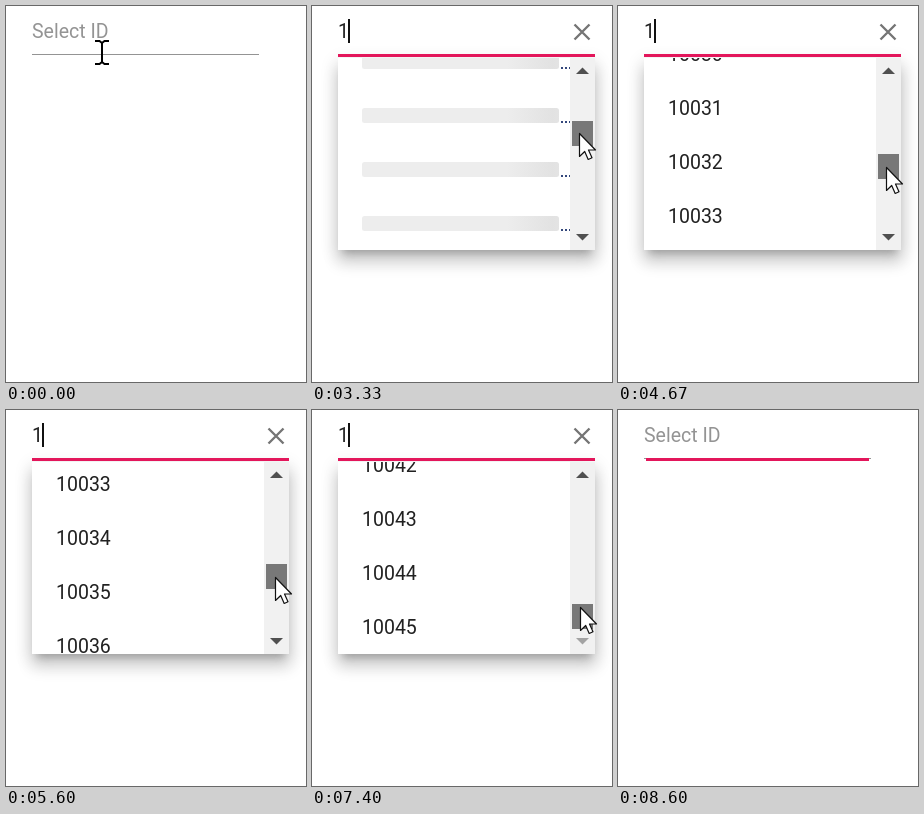
An HTML page for the animation above (8.67 s loop, 300 px wide and 376 px high).

```html
<!DOCTYPE html>
<html lang="en">
<head>
<meta charset="utf-8">
<title>Select ID</title>
<style>
html, body { margin: 0; width: 100%; height: 100%; overflow: hidden; background: #fff; }
#shadow {
  position: absolute; left: 26px; top: 52px; width: 257px; height: 192px; background: #fff;
  box-shadow: 0 7.5px 7.5px -4.5px rgba(0,0,0,.2), 0 12px 15px 1.5px rgba(0,0,0,.14), 0 4.5px 16px 2px rgba(0,0,0,.12);
}
svg { position: absolute; left: 0; top: 0; display: block; }
text { font: 19.5px Roboto, sans-serif; fill: #212121; white-space: pre; }
</style>
</head>
<body>
<div id="shadow"></div>
<svg width="300" height="376" viewBox="0 0 300 376">
  <defs>
    <clipPath id="view"><rect x="26" y="52" width="232" height="192"/></clipPath>
    <linearGradient id="wave" gradientUnits="userSpaceOnUse" x1="-45" x2="45">
      <stop offset="0" stop-color="#ededed"/>
      <stop offset=".5" stop-color="#e2e2e2"/>
      <stop offset="1" stop-color="#ededed"/>
    </linearGradient>
  </defs>

  <rect id="line" x="26" y="48" height="1" fill="#949494"/>
  <rect id="focus" y="48" height="3" fill="#e3165b"/>
  <text id="hint" x="26" y="32" style="fill:#949494">Select ID</text>
  <g id="value">
    <text x="26" y="32">1</text>
    <path d="M262.5 18.5l15 15m0-15l-15 15" stroke="#757575" stroke-width="2.4"/>
  </g>
  <rect id="caret" y="13.5" width="2" height="24" fill="#111"/>

  <g id="list">
    <g clip-path="url(#view)">
      <rect id="hover" x="26" width="232" height="54" fill="#eee"/>
      <g id="rows"></g>
      <g id="bars"></g>
    </g>
    <rect x="258" y="52" width="25" height="192" fill="#f1f1f1"/>
    <rect id="thumb" x="260" width="21" height="25"/>
    <path id="up" d="M264 68h13l-6.5-6.5z"/>
    <path id="down" d="M264 228h13l-6.5 6.5z"/>
  </g>

  <g id="beam" fill="none" stroke="#000" stroke-width="2">
    <path d="M-7-12h4.5L0-10l2.500-2H7M-7 11h4.500L0 9l2.500 2H7M0-10V9"/>
  </g>
  <path id="hand" fill="#fff" stroke="#111" stroke-width="1.2" stroke-linejoin="round"
    d="M-3 2Q-3-.5-1-.5T1 2V12Q1 10 3 10T5.500 12.500V14Q6 11.500 8 12T9.500 14.500V15.500Q10.500 13.500 12 14.500T13.500 17V22Q13.500 26 11 29V31.500H-2V28.500L-9.500 18.500Q-11 15-8.500 14.500Q-6 14.500-3 19Z M1 12V18M5.500 13V18M9.500 15V18"/>
  <path id="arrow" fill="#fff" stroke="#111" stroke-width="1.2" stroke-linejoin="round"
    d="M.5.500V23.500L5.700 18.500 9.200 26.500 13 24.800 9.500 17H16.500Z"/>
</svg>
<script>
const LOOP = 8670, ROW = 54, TOP = 52, BOTTOM = 244;
const $ = id => document.getElementById(id);
const set = (id, attrs) => { for (const k in attrs) $(id).setAttribute(k, attrs[k]); };
const show = (id, on) => { $(id).style.display = on ? '' : 'none'; };
const within = (t, a, b) => t >= a && t < b;
const clamp = v => Math.max(0, Math.min(1, v));
const ease = p => p * p * (3 - 2 * p);

// keys: [[time, value], ...], linear in between
function track(keys, t) {
  let i = 0;
  while (i < keys.length - 1 && keys[i + 1][0] <= t) i++;
  const [a, b] = [keys[i], keys[i + 1]];
  return !b || t <= a[0] ? a[1] : a[1] + (b[1] - a[1]) * (t - a[0]) / (b[0] - a[0]);
}

const thumbKeys = [[2760, 77], [2930, 86], [3330, 115], [3600, 128], [3670, 129], [4130, 141],
  [4400, 148], [5380, 148], [5600, 154], [5730, 158], [5830, 158], [5930, 162], [6090, 162],
  [6530, 176], [6690, 176], [6870, 181], [7030, 181], [7400, 194]];
const scrollKeys = [[77, 0], [154, 1732.5], [194, 2238]];
const gripKeys = [[2600, 10], [3330, 12], [5600, 13], [7400, 3]];
const gripX = [[2600, 265], [3330, 267], [4130, 268], [5600, 269], [7400, 268]];

const el = (parent, name, attrs) => {
  const e = document.createElementNS('http://www.w3.org/2000/svg', name);
  for (const k in attrs) e.setAttribute(k, attrs[k]);
  return parent.appendChild(e);
};
const rows = Array.from({ length: 5 }, () => el($('rows'), 'text', { x: 50 }));
for (let i = 0; i < 4; i++) {
  const y = i * ROW;
  el($('bars'), 'rect', { x: 50, y, width: 197, height: 15, rx: 2.5, fill: 'url(#wave)' });
  for (const x of [249, 253, 257]) el($('bars'), 'rect', { x, y: y + 13, width: 2, height: 2, fill: '#34487c' });
}

function pointer(t, thumb) {
  const glide = (a, b, x0, y0, x1, y1) => {
    const p = ease(clamp((t - a) / (b - a)));
    return [x0 + (x1 - x0) * p, y0 + (y1 - y0) * p];
  };
  if (t < 1500) return glide(70, 270, 96, 47, 99, 37);
  if (t < 2070) return glide(1500, 1930, 99, 37, 110, 55);
  if (t < 2600) return glide(2070, 2600, 110, 55, 265, 87);
  if (t < 7560) return [track(gripX, t), thumb + track(gripKeys, t)];
  return glide(7560, 8270, 268, 197, 200, 382);
}

function drawField(t) {
  const blurred = t >= 8600, focused = t >= 200 && !blurred, typed = within(t, 1400, 8600);
  const right = focused ? 283 : 253;
  const grow = blurred ? 223 / 227 : ease(clamp((t - 200) / 330));
  const w = (right - 26) * grow;
  set('line', { width: right - 26 });
  set('focus', { x: (26 + right - w) / 2, width: w });
  show('hint', !typed);
  show('value', typed);
  set('caret', { x: typed ? 36 : 26, y: typed ? 13 : 14 });
  show('caret', focused && !within(t, 870, 1400) && !within(t, 1930, 2430) && !within(t, 7770, 8270));
}

function drawList(t, thumb, x, y) {
  const open = within(t, 1470, 8600), fade = open ? clamp((t - 1470) / 130) : 0;
  $('shadow').style.opacity = fade;
  $('list').style.opacity = fade;
  const scroll = track(scrollKeys, thumb);
  const loading = within(t, 2930, 4670) || within(t, 5670, 6330);
  const drag = within(t, 2760, 7560);
  const inside = open && !drag && within(x, 26, 258) && within(y, TOP, BOTTOM);

  show('rows', !loading);
  show('bars', loading);
  const first = Math.floor(scroll / ROW);
  rows.forEach((row, i) => {
    const n = first + i;
    row.textContent = n < 45 ? 10001 + n : '';
    row.setAttribute('y', 86 + n * ROW - scroll);
  });
  show('hover', inside);
  if (inside) set('hover', { y: TOP + Math.floor((y - TOP + scroll) / ROW) * ROW - scroll });

  set('bars', { transform: `translate(0 ${Math.round(track([[3330, 48], [4130, 49]], t))})` });
  const phase = ((t - 2413) % 1600 + 1600) % 1600;
  set('wave', { gradientTransform: `translate(${-30 + phase * 0.2945})` });

  const over = within(x, 260, 281) && within(y, thumb, thumb + 25);
  set('thumb', { y: Math.round(thumb), fill: drag ? '#787878' : over ? '#a8a8a8' : '#c1c1c1' });
  set('up', { fill: thumb > 77 ? '#505050' : '#a3a3a3' });
  set('down', { fill: thumb < 194 ? '#505050' : '#a3a3a3' });
  return inside;
}

function draw(t) {
  const thumb = track(thumbKeys, t);
  const [x, y] = pointer(t, thumb);
  drawField(t);
  const inside = drawList(t, thumb, x, y);
  const kind = t >= 8270 ? '' : inside ? 'hand' : y < TOP ? 'beam' : 'arrow';
  for (const id of ['beam', 'hand', 'arrow']) {
    show(id, id === kind);
    set(id, { transform: `translate(${Math.round(x)} ${Math.round(y)})` });
  }
}

const start = performance.now();
function tick() {
  draw((performance.now() - start) % LOOP);
  requestAnimationFrame(tick);
}
tick();
</script>
</body>
</html>
```
